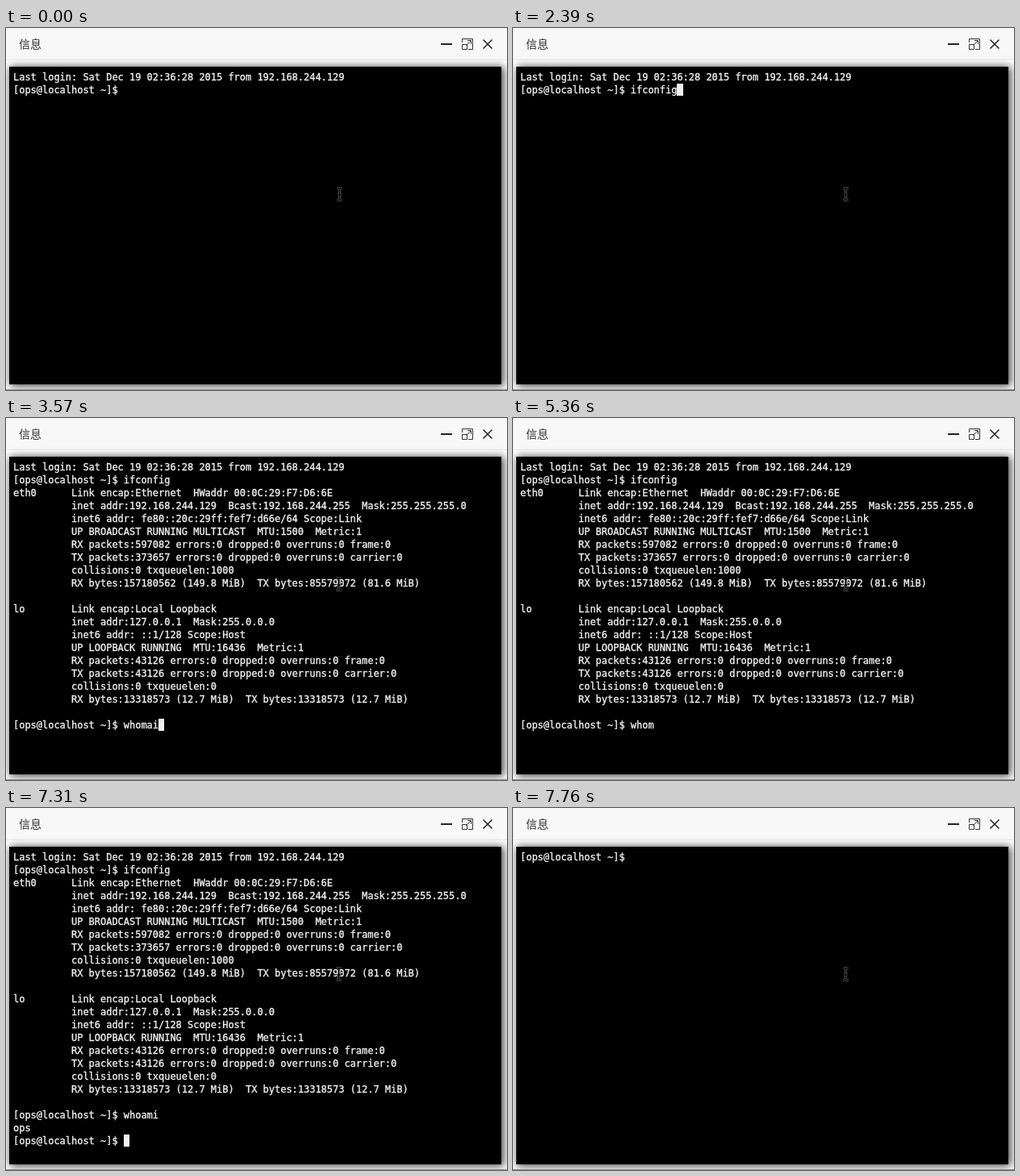
These frames come from a looping animation (621 px wide and 449 px high, 8000 ms). An HTML page:

```html
<!DOCTYPE html>
<html lang="zh">
<head>
<meta charset="utf-8">
<title>信息</title>
<style>
  html, body { margin: 0; width: 100%; height: 100%; overflow: hidden; background: #fff; }
  #stage { position: relative; width: 621px; height: 449px; overflow: hidden; background: #fff; }
  #stage > * { position: absolute; }
  #bar { left: 0; top: 0; width: 621px; height: 39px; background: #f8f8f8; border-bottom: 1px solid #eee; }
  #title { left: 16px; top: 9px; font: 14px/20px "Noto Sans CJK SC", "Noto Sans CJK", sans-serif; color: #333; }
  #term { left: 4px; top: 48px; width: 610px; height: 394px; background: #000; box-shadow: 2px 1px 10px 1px rgba(0, 0, 0, .75); }
  #foot { left: 0; top: 448px; width: 621px; height: 1px; background: #8c8c8c; }
  #text {
    left: 9px; top: 53px; margin: 0; white-space: pre; color: #f0f0f0;
    font: 12px/16px "DejaVu Sans Mono", monospace; letter-spacing: -.0245px;
    -webkit-text-stroke: .35px #f0f0f0;
  }
  #caret { height: 15px; background: #f0f0f0; }
  svg { left: 0; top: 0; fill: none; }
</style>
</head>
<body>
<div id="stage">
  <div id="bar"></div>
  <div id="title">信息</div>
  <div id="term"></div>
  <div id="foot"></div>
  <pre id="text"></pre>
  <div id="caret"></div>
  <svg width="621" height="449">
    <path d="M539 20H553" stroke="#222" stroke-width="2"/>
    <path d="M565.5 18V13.5H578.5V26.5H573M565.5 20.5H571.5V26.5H565.5ZM570.5 21.5L576 16M572 15.5H576.5V20" stroke="#333"/>
    <path d="M591.5 14.5L602.5 25.500M602.5 14.5L591.5 25.500" stroke="#222" stroke-width="1.5"/>
    <g id="mouse">
      <path id="beam" d="M-3.500 198.500H-2Q0 198.500 0 200.500Q0 198.500 2 198.500H3.500M0 200V212M-2 207H2M-3.500 213.500H-2Q0 213.500 0 211.500Q0 213.500 2 213.500H3.500" stroke="#777" stroke-width="2.6"/>
      <use href="#beam" id="core"/>
      <path d="M-3.500 198.500H-2Q0 198.500 0 200.500Q0 198.500 2 198.500H3.500M0 200V212M-2 207H2M-3.500 213.500H-2Q0 213.500 0 211.500Q0 213.500 2 213.500H3.500" stroke="#000" stroke-width="1.3"/>
    </g>
  </svg>
</div>
<script>
const LOOP = 8000, CELL = 7.2, LEFT = 9, TOP = 53, ROW = 16;
const PROMPT = "[ops@localhost ~]$ ";
const login = "Last login: Sat Dec 19 02:36:28 2015 from 192.168.244.129\n" + PROMPT;

const device = (name, lines) =>
  lines.map((line, i) => (i ? "" : name).padEnd(10) + line).join("\n") + "\n\n";

const report = login + "ifconfig\n" + device("eth0", [
  "Link encap:Ethernet  HWaddr 00:0C:29:F7:D6:6E",
  "inet addr:192.168.244.129  Bcast:192.168.244.255  Mask:255.255.255.0",
  "inet6 addr: fe80::20c:29ff:fef7:d66e/64 Scope:Link",
  "UP BROADCAST RUNNING MULTICAST  MTU:1500  Metric:1",
  "RX packets:597082 errors:0 dropped:0 overruns:0 frame:0",
  "TX packets:373657 errors:0 dropped:0 overruns:0 carrier:0",
  "collisions:0 txqueuelen:1000",
  "RX bytes:157180562 (149.8 MiB)  TX bytes:85579072 (81.6 MiB)"
]) + device("lo", [
  "Link encap:Local Loopback",
  "inet addr:127.0.0.1  Mask:255.0.0.0",
  "inet6 addr: ::1/128 Scope:Host",
  "UP LOOPBACK RUNNING  MTU:16436  Metric:1",
  "RX packets:43126 errors:0 dropped:0 overruns:0 frame:0",
  "TX packets:43126 errors:0 dropped:0 overruns:0 carrier:0",
  "collisions:0 txqueuelen:0",
  "RX bytes:13318573 (12.7 MiB)  TX bytes:13318573 (12.7 MiB)"
]) + PROMPT;
const answer = report + "whoami\nops\n" + PROMPT;

// start time, screen, typed text, caret shown
const steps = [
  [0, login, "", 0], [300, login, "", 1], [750, login, "", 0],
  [1350, login, "i", 1], [1800, login, "i", 0],
  [2100, login, "ifc", 1], [2240, login, "ifcon", 1], [2390, login, "ifconfig", 1],
  [2540, report, "", 1],
  [2840, report, "w", 1], [2990, report, "wh", 1], [3140, report, "who", 1],
  [3280, report, "whom", 1], [3430, report, "whoma", 1], [3570, report, "whomai", 1],
  [3870, report, "whomai", 0], [4320, report, "whomai", 1], [4770, report, "whomai", 0],
  [4920, report, "whoma", 1], [5060, report, "whom", 1], [5360, report, "whom", 0],
  [5810, report, "who", 1], [5960, report, "whoa", 1], [6110, report, "whoami", 1],
  [6260, report, "whoami", 0],
  [6560, answer, "", 1], [6860, answer, "", 0], [7310, answer, "", 1],
  [7610, PROMPT, "", 1], [7760, PROMPT, "", 0]
];

const [text, caret, mouse] = ["text", "caret", "mouse"].map(id => document.getElementById(id));
document.getElementById("core").remove();
let shown;

function draw(now) {
  const t = now % LOOP;
  const step = steps.findLast(s => s[0] <= t);
  mouse.setAttribute("transform", `translate(${t < 150 ? 413.5 : 412.5} 0)`);
  if (step !== shown) {
    shown = step;
    const [, screen, typed, on] = step;
    const lines = (screen + typed).split("\n");
    const column = lines.at(-1).length;
    const edge = n => Math.round(LEFT + n * CELL);
    text.textContent = screen + typed;
    caret.style.left = edge(column) + "px";
    caret.style.width = edge(column + 1) - edge(column) + "px";
    caret.style.top = TOP + (lines.length - 1) * ROW + "px";
    caret.style.visibility = on ? "visible" : "hidden";
  }
  requestAnimationFrame(() => draw(performance.now()));
}
draw(0);
</script>
</body>
</html>
```
